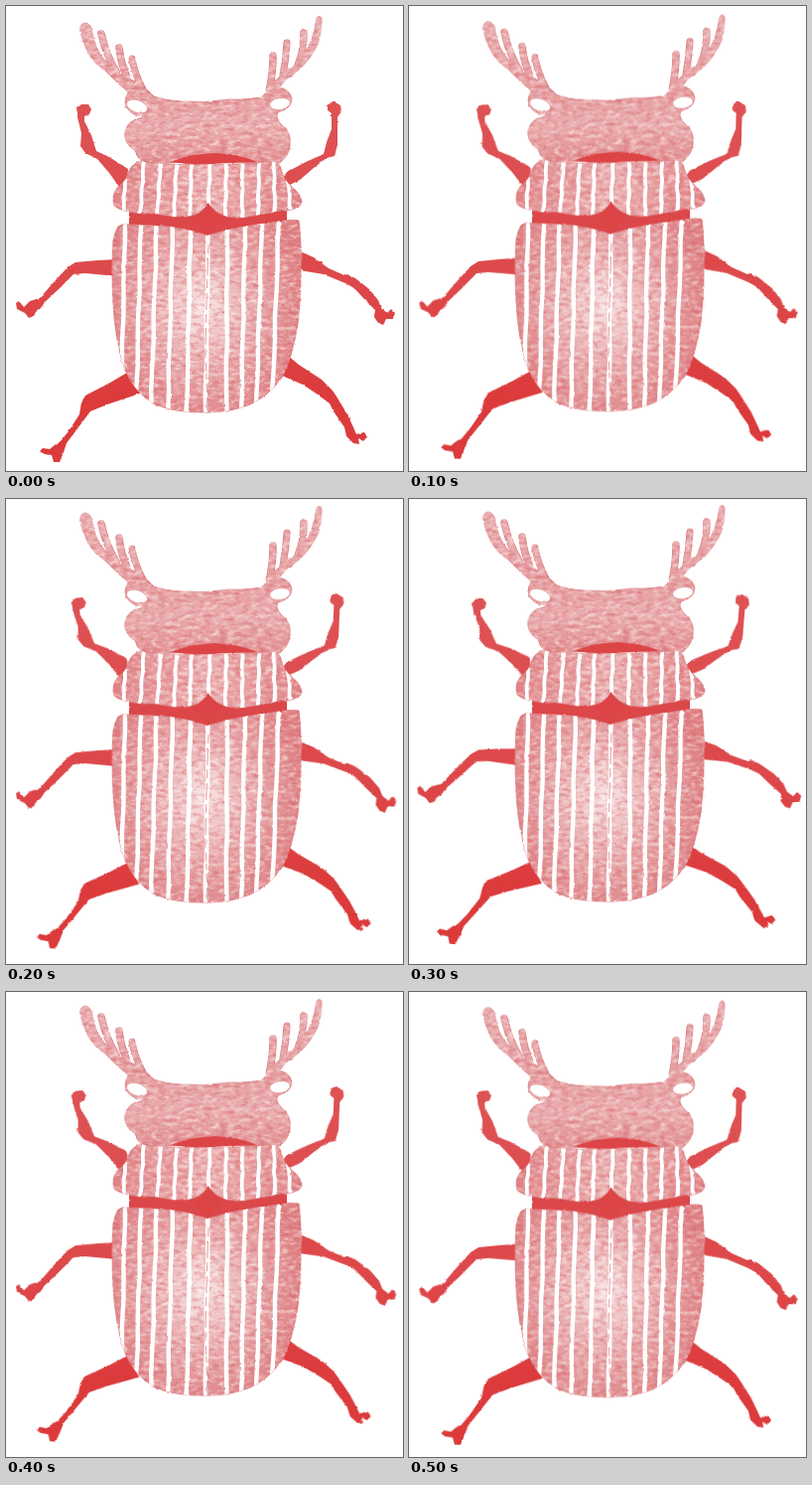
An HTML page that plays this animation: 400x468 px, repeating every 600 ms.

```html
<!DOCTYPE html>
<html lang="en">
<head>
<meta charset="utf-8">
<title>Walking beetle</title>
<style>
html, body { margin: 0; width: 100%; height: 100%; overflow: hidden; background: #fff; }
svg { display: block; width: 400px; height: 468px; }
</style>
</head>
<body>
<svg viewBox="0 0 400 468">
  <defs>
    <filter id="rough" filterUnits="userSpaceOnUse" x="-20" y="-20" width="440" height="508" color-interpolation-filters="sRGB">
      <feTurbulence type="fractalNoise" baseFrequency=".2" numOctaves="2" seed="4" result="n"/>
      <feDisplacementMap in="SourceGraphic" in2="n" scale="2.2" xChannelSelector="R" yChannelSelector="G"/>
    </filter>
    <filter id="paint" filterUnits="userSpaceOnUse" x="-20" y="-20" width="440" height="508" color-interpolation-filters="sRGB">
      <feTurbulence type="fractalNoise" baseFrequency=".2" numOctaves="2" seed="4" result="n"/>
      <feDisplacementMap in="SourceGraphic" in2="n" scale="2.2" xChannelSelector="R" yChannelSelector="G" result="shape"/>
      <feTurbulence type="fractalNoise" baseFrequency=".13 .26" numOctaves="3" seed="2" result="grain"/>
      <feColorMatrix in="grain" values="0 0 0 0 1  0 0 0 0 .96  0 0 0 0 .96  1.5 0 0 0 -.64" result="light"/>
      <feColorMatrix in="grain" values="0 0 0 0 .84  0 0 0 0 .4  0 0 0 0 .43  0 1.4 0 0 -.62" result="dark"/>
      <feComposite in="light" in2="shape" operator="atop" result="lit"/>
      <feComposite in="dark" in2="lit" operator="atop"/>
    </filter>
    <radialGradient id="wing" gradientUnits="userSpaceOnUse" cx="0" cy="0" r="1" gradientTransform="translate(197 303) scale(104 125)">
      <stop offset="0" stop-color="#f9e6e6"/>
      <stop offset=".35" stop-color="#edbabb"/>
      <stop offset=".75" stop-color="#e29496"/>
      <stop offset="1" stop-color="#de7f82"/>
    </radialGradient>
    <linearGradient id="neck" gradientUnits="userSpaceOnUse" x1="108" y1="0" x2="298" y2="0">
      <stop offset="0" stop-color="#e08386"/>
      <stop offset=".5" stop-color="#ecb2b3"/>
      <stop offset="1" stop-color="#e08386"/>
    </linearGradient>
    <linearGradient id="face" gradientUnits="userSpaceOnUse" x1="0" y1="85" x2="0" y2="158">
      <stop offset="0" stop-color="#e59c9e"/>
      <stop offset=".5" stop-color="#eaadae"/>
      <stop offset="1" stop-color="#e28f91"/>
    </linearGradient>
    <linearGradient id="horn" gradientUnits="userSpaceOnUse" x1="0" y1="15" x2="0" y2="88">
      <stop offset="0" stop-color="#ebb2b3"/>
      <stop offset="1" stop-color="#e6a0a2"/>
    </linearGradient>
    <linearGradient id="limb" gradientUnits="userSpaceOnUse" x1="0" y1="100" x2="0" y2="400">
      <stop offset="0" stop-color="#de5254"/>
      <stop offset=".6" stop-color="#dd484a"/>
      <stop offset="1" stop-color="#dc3a3b"/>
    </linearGradient>
    <path id="wings" d="M113 222Q118 218 124 220L165 222Q186 225 203 231Q222 225 245 221L288 215L295 216Q297 228 297 245Q298 285 294 320Q289 352 278 374Q264 393 246 401Q226 409 203 409Q170 410 148 400Q128 387 119 364Q110 336 108 300Q106 262 108 236Q110 226 113 222Z"/>
    <path id="plate" d="M131 158Q136 154 148 157Q165 161 202 159Q240 160 258 157Q273 154 276 161Q279 175 288 182Q298 190 298 198Q294 206 276 206Q260 209 250 211Q229 216 215 209Q207 204 204 198Q199 207 190 210Q176 214 162 211Q150 207 137 209Q116 207 109 201Q106 191 112 183Q122 176 124 166Q126 161 131 158Z"/>
    <clipPath id="inWings"><use href="#wings"/></clipPath>
    <clipPath id="inPlate"><use href="#plate"/></clipPath>
  </defs>

  <g id="legs" fill="url(#limb)" filter="url(#rough)"></g>

  <g id="body">
    <path filter="url(#rough)" fill="#dc4749" d="M124 207L160 210L203 196L245 211L283 205V216L245 221L203 232L165 223L124 220Z"/>
    <g filter="url(#paint)" stroke="#da7b7e" stroke-width=".9">
      <use href="#wings" fill="url(#wing)"/>
      <use href="#plate" fill="url(#neck)"/>
    </g>
    <g filter="url(#rough)" fill="none" stroke="#fff">
      <g id="wingLines" clip-path="url(#inWings)"></g>
      <path d="M204 240L202 300L201 345L203 407" stroke="#e09a9c" stroke-dasharray="9 5 17 4"/>
      <g id="plateLines" clip-path="url(#inPlate)"></g>
    </g>
    <g filter="url(#paint)" stroke="#da8083" stroke-width="1">
      <g id="horns" fill="none" stroke-linecap="round"></g>
      <path fill="url(#face)" d="M120 97Q121 85 130 82Q142 83 149 91Q160 95 176 96Q201 98 225 94Q244 95 259 91Q263 82 274 82Q286 83 288 94Q287 104 274 107Q271 112 277 119Q288 127 286 140Q285 152 275 158Q265 154 253 158Q210 153 166 158Q154 158 142 157Q131 155 131 146Q118 139 120 126Q123 115 135 113Q141 111 133 110Q122 108 120 97Z"/>
    </g>
    <g filter="url(#rough)">
      <g fill="#fff" stroke="#df8d90" stroke-width=".8">
        <ellipse cx="132" cy="101" rx="11" ry="6.3" transform="rotate(20 132 101)"/>
        <ellipse cx="276" cy="98.5" rx="10.5" ry="6" transform="rotate(-9 276 98.5)"/>
      </g>
      <g fill="#dc4446">
        <path d="M166 157Q182 149 210 148Q236 149 253 157Q236 158 221 158Q190 161 166 157Z"/>
        <path d="M203 198Q207 207 218 212L203 231L188 212Q200 208 203 198Z"/>
      </g>
    </g>
  </g>
</svg>
<script>
const NS = 'http://www.w3.org/2000/svg';
const byId = id => document.getElementById(id);

function addPath(parent, d, attrs = {}) {
  const p = document.createElementNS(NS, 'path');
  p.setAttribute('d', d);
  for (const k in attrs) p.setAttribute(k, attrs[k]);
  byId(parent).append(p);
  return p;
}

// Slightly wobbling pale lines running down the shell
function stripes(parent, tops, lows, y0, y1, width) {
  tops.forEach((x, i) => {
    const points = [];
    for (let k = 0; k <= 8; k++) {
      const t = k / 8;
      const wobble = Math.sin(k * 2.1 + i * 1.7) * .6;
      points.push((x + (lows[i] - x) * t + wobble).toFixed(1) + ' ' + (y0 + (y1 - y0) * t));
    }
    addPath(parent, 'M' + points.join('L'), { 'stroke-width': width });
  });
}
stripes('wingLines', [120, 136, 152, 168, 186, 204, 223, 241, 258, 275],
  [116, 131, 146, 163, 182, 201, 222, 237, 252, 268], 214, 410, 4.4);
stripes('plateLines', [121, 139, 156, 172, 187, 206, 222, 238, 255, 270, 283],
  [118, 135, 152, 169, 185, 203, 221, 238, 254, 271, 287], 154, 214, 3.8);

// Each antler: an outline for the beam, then rounded tines
const beams = [
  'M75 25Q74 17 80 17Q86 18 87 27Q90 44 99 54Q110 67 124 73Q138 79 149 91L128 91Q120 84 110 75Q100 64 91 58Q82 49 79 38Q76 32 75 25Z',
  'M313 12Q316 8 318 13Q318 33 311 44Q302 60 290 68Q278 76 273 86L260 92Q264 80 275 72Q290 62 299 50Q310 36 313 12Z'
];
const tines = [
  ['M96 28Q101 50 111 66', 6.5],
  ['M114 42Q116 60 123 74', 6.5],
  ['M127 53Q129 66 137 82', 6],
  ['M300 27Q300 45 295 57', 6.5],
  ['M283 37Q282 54 279 70', 6],
  ['M269 50Q269 68 265 86', 6.5]
];
beams.forEach(d => addPath('horns', d));
tines.forEach(([d, w]) => addPath('horns', d, { 'stroke-width': w + 1 }));
tines.forEach(([d, w]) => addPath('horns', d, { stroke: 'url(#horn)', 'stroke-width': w - .8 }));
beams.forEach(d => addPath('horns', d, { stroke: 'none', fill: 'url(#horn)' }));

// Outline, hip and turn in degrees for each of the four poses
const legs = [
  { hip: [118, 172], turn: [0, -2.6, -4.6, -7],
    d: 'M71 103L76 99L83 99L86 104L84 109L79 111L79 116L86 130L91 146L104 152L123 164L122 177L114 182L104 168L92 154L80 148L75 141L76 128L72 112L72 108Z' },
  { hip: [285, 168], turn: [0, 1.6, 2.3, 4.6],
    d: 'M324 99L330 96L337 100L338 106L334 112L334 130L334 140L331 151L323 153L310 163L296 175L284 181L278 174L283 167L302 157L320 149L323 137L328 124L328 108L324 105Z' },
  { hip: [108, 262], turn: [0, -.6, -.1, 2.6],
    d: 'M112 255L92 256L70 258L62 263L48 278L34 294L24 297L18 303L13 297L10 299L11 305L19 309L23 314L28 312L30 308L35 304L39 298L52 286L68 270L80 269L112 272Z' },
  { hip: [296, 258], turn: [0, .4, -1.6, -3.8],
    d: 'M290 244L310 253L325 264L341 271L344 270L352 274L366 285L375 296L378 304L384 309L388 305L392 309L390 315L383 315L380 321L375 319L371 313L372 306L361 295L351 284L342 279L320 270L290 265Z' },
  { hip: [125, 378], turn: [0, 1.5, 2.8, 5.4],
    d: 'M122 369L105 379L80 392L76 399L74 411L63 428L55 438L50 441L44 446L37 445L34 448L38 451L46 452L48 459L54 459L58 449L61 440L73 424L85 408L102 401L135 390Z' },
  { hip: [285, 365], turn: [0, -.9, -3, -4.6],
    d: 'M283 351L295 361L318 376L329 387L333 393L344 411L350 424L353 431L361 429L364 434L360 438L355 435L356 441L350 440L343 433L341 424L330 408L326 400L314 391L299 381L278 372Z' }
];

const lift = [0, -1.4, -2.9, -3.9];
const order = [0, 1, 2, 3, 2, 1];
const start = document.timeline.currentTime || 0;

function play(el, pose) {
  const frames = [...order, 0].map((p, i) => ({
    offset: i / order.length, transform: pose(p), easing: 'steps(1, end)'
  }));
  el.animate(frames, { duration: 600, iterations: Infinity }).startTime = start;
}

play(byId('body'), p => `translate(0px, ${lift[p]}px)`);
legs.forEach(({ hip, turn, d }) => {
  const el = addPath('legs', d);
  el.style.transformOrigin = `${hip[0]}px ${hip[1]}px`;
  play(el, p => `translate(0px, ${lift[p]}px) rotate(${turn[p]}deg)`);
});
</script>
</body>
</html>
```
